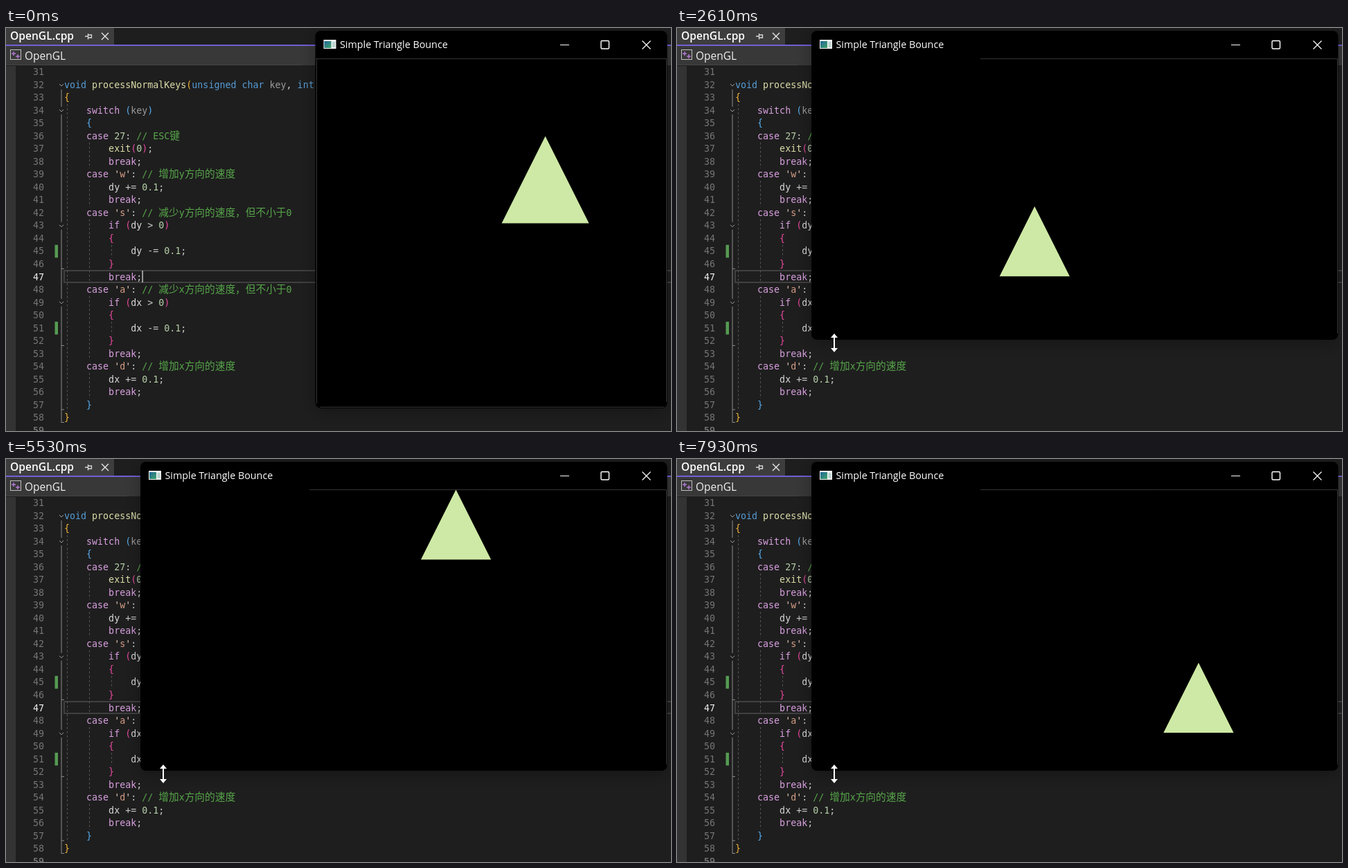
Recreate the animation shown at these times as an HTML page with a canvas. Size 960 by 583 pixels, loop 7.99 s.

```html
<!DOCTYPE html>
<html lang="en">
<head>
<meta charset="utf-8">
<title>Triangle bounce</title>
<style>
html, body { margin: 0; height: 100%; overflow: hidden; background: #1e1e1e; }
canvas { display: block; }
</style>
</head>
<body>
<canvas id="stage" width="960" height="583"></canvas>
<script>
const ctx = document.getElementById('stage').getContext('2d');
const LOOP = 7990, DRAG_START = 1020, DRAG_END = 1600;
const MONO = '13.32px "DejaVu Sans Mono", monospace';
const CJK = '14.7px "Noto Sans CJK SC", "Noto Sans CJK", sans-serif';
const UI = '"Open Sans", "Noto Sans", sans-serif';
const FIRST_LINE = 31, LINE_HEIGHT = 18.52;

const code = `
void processNormalKeys(unsigned char key, int x, int y)
{
    switch (key)
    {
    case 27: // ESC键
        exit(0);
        break;
    case 'w': // 增加y方向的速度
        dy += 0.1;
        break;
    case 's': // 减少y方向的速度，但不小于0
        if (dy > 0)
        {
            dy -= 0.1;
        }
        break;
    case 'a': // 减少x方向的速度，但不小于0
        if (dx > 0)
        {
            dx -= 0.1;
        }
        break;
    case 'd': // 增加x方向的速度
        dx += 0.1;
        break;
    }
}
`.split('\n');

const tokenRules = [
  [/^\/\/.*/, '#57a64a'],
  [/^'/, '#e8c9bb'],
  [/^[wsad](?=')/, '#d69d85'],
  [/^(void|unsigned|char|int)\b/, '#569cd6'],
  [/^(switch|case|break|if)\b/, '#d8a0df'],
  [/^(processNormalKeys|exit)\b/, '#dcdcaa'],
  [/^(key|x|y)\b/, '#9a9a9a'],
  [/^[\d.]+/, '#b5cea8'],
  [/^\w+/, '#dadada'],
  [/^\s+/, '#dadada'],
  [/^[^\w\s]/, '#c8c8c8']
];
const bracketColors = ['#f2b53c', '#58aeee', '#e8489f'];

const clamp01 = v => Math.min(1, Math.max(0, v));
const smooth = v => v * v * (3 - 2 * v);
const mix = (a, b, p) => a + (b - a) * p;

// Reflects an unbounded coordinate between two walls.
function bounce(v, low, high) {
  const span = high - low;
  const phase = (((v - low) % (2 * span)) + 2 * span) % (2 * span);
  return low + span - Math.abs(phase - span);
}

// Distance travelled: the program stalls during the drag and its frame rate wavers.
const travelKeys = [[0, 0], [1060, 161], [1580, 161], [3470, 450], [4120, 548],
  [4870, 642], [6180, 842], [LOOP, 1125]];

function travelled(t) {
  const i = travelKeys.findIndex(([time]) => time > t);
  const [t0, d0] = travelKeys[i - 1], [t1, d1] = travelKeys[i];
  return mix(d0, d1, (t - t0) / (t1 - t0));
}

// Apex position in the final window; each press of D adds to the speed along x.
const keyPresses = [369, 448, 546, 612];

function triangleAt(t) {
  const d = travelled(t);
  const boost = keyPresses.reduce((sum, press) => sum + Math.max(0, d - press), 0);
  return {
    x: bounce(729 - 0.96 * Math.abs(d - 96.5) + 1.045 * boost, 247.5, 899.5),
    y: bounce(134.6 - d, 37, 356)
  };
}

// The dragged lower left corner swings past its resting place.
function cornerAt(t) {
  const p = smooth(clamp01((t - DRAG_START) / (DRAG_END - DRAG_START)));
  return {
    left: mix(446.5, 194, p) - 150 * Math.sin(Math.PI * p) ** 2,
    bottom: mix(549, 450, p)
  };
}

function rect(x, y, w, h, color) {
  ctx.fillStyle = color;
  ctx.fillRect(x, y, w, h);
}

function stroke(color, width, ...lines) {
  ctx.strokeStyle = color;
  ctx.lineWidth = width;
  ctx.beginPath();
  for (const [x, y, ...rest] of lines) {
    ctx.moveTo(x, y);
    for (let i = 0; i < rest.length; i += 2) ctx.lineTo(rest[i], rest[i + 1]);
  }
  ctx.stroke();
}

function polygon(color, ...p) {
  ctx.fillStyle = color;
  ctx.beginPath();
  for (let i = 0; i < p.length; i += 2) ctx.lineTo(p[i], p[i + 1]);
  ctx.closePath();
  ctx.fill();
}

function text(s, x, y, font, color) {
  ctx.font = font;
  ctx.fillStyle = color;
  ctx.fillText(s, x, y);
}

// Latin and Chinese runs have their own font sizes.
function codeText(s, x, y, color) {
  for (const run of s.match(/[ -~]+|[^ -~]+/g)) {
    text(run, x, y, run[0] <= '~' ? MONO : CJK, color);
    x += ctx.measureText(run).width;
  }
  return x;
}

const lineTop = n => 73 + (n - 32) * LINE_HEIGHT;

function drawLineNumber(n) {
  ctx.textAlign = 'right';
  text(n, 55, lineTop(n) + 13.7, MONO, n === 47 ? '#f0f0f0' : '#757575');
  ctx.textAlign = 'left';
}

function drawCode() {
  let depth = 0;
  code.forEach((line, i) => {
    const n = FIRST_LINE + i, top = lineTop(n);
    drawLineNumber(n);

    ctx.setLineDash([3, 3]);
    for (let col = 0; col < line.search(/\S/); col += 4) {
      const x = 88.5 + col * 8;
      stroke('#545454', 1, [x, top, x, top + LINE_HEIGHT]);
    }
    ctx.setLineDash([]);

    let x = 84, rest = line;
    while (rest) {
      const [rule, base] = tokenRules.find(([r]) => r.test(rest));
      const token = rest.match(rule)[0];
      let color = base;
      if (/^[({]$/.test(token)) color = bracketColors[depth++];
      if (/^[)}]$/.test(token)) color = bracketColors[--depth];
      x = codeText(token, x, top + 13.7, color);
      rest = rest.slice(token.length);
    }
  });
  drawLineNumber(59);
}

function drawOutline() {
  const x = 80;
  rect(x - 0.5, 89, 1, 482, '#8c8c8c');
  for (const n of [46, 52, 57, 58]) rect(x, lineTop(n + 1) - 3, 4, 1, '#8c8c8c');
  for (const n of [32, 34, 43, 49]) {
    const y = lineTop(n) + 9;
    rect(x - 3, y - 5, 7, 11, '#1e1e1e');
    stroke('#a0a0a0', 1, [x - 3, y - 1, x, y + 2, x + 3, y - 1]);
  }
}

function drawEditor(t) {
  rect(0, 0, 960, 583, '#1e1e1e');
  rect(0, 55, 14, 528, '#333333');
  rect(0, 0, 156, 24, '#3d3d3d');
  rect(0, 26, 960, 28, '#383838');
  rect(0, 24, 960, 2, '#7160d8');
  rect(0, 53, cornerAt(t).left - 19, 1, '#434343');

  text('OpenGL.cpp', 6, 16.5, '600 15.6px ' + UI, '#fff');
  stroke('#d8d8d8', 1.3, [114, 12, 118, 12], [118.5, 8, 118.5, 16.5],
    [118.5, 10, 123.5, 10, 123.5, 14, 118.5, 14]);
  stroke('#e8e8e8', 1.4, [138, 7, 148, 17], [148, 7, 138, 17]);
  ctx.strokeStyle = '#c0c0c0';
  ctx.lineWidth = 1;
  ctx.strokeRect(6.5, 31.5, 15, 14);
  stroke('#b57ad6', 1.4, [8, 37, 14, 37], [11, 34, 11, 40], [14, 41, 20, 41], [17, 38, 17, 44]);
  text('OpenGL', 27, 45.5, '15.5px ' + UI, '#f0f0f0');

  stroke('#404040', 2, [960, 351, 84, 351, 84, 368, 960, 368]);
  for (const n of [45, 51]) rect(70.5, lineTop(n), 4.5, LINE_HEIGHT, '#559a52');
  drawOutline();
  drawCode();
  if (t % 1060 < 530) rect(196.5, 351, 1.2, 17, '#e8e8e8');
}

function drawWindow(t) {
  const { left, bottom } = cornerAt(t), right = 954.5;
  ctx.save();
  ctx.shadowColor = 'rgba(0,0,0,.3)';
  ctx.shadowBlur = 24;
  ctx.shadowOffsetY = 4;
  ctx.fillStyle = '#000';
  ctx.beginPath();
  ctx.roundRect(left, 4, right - left, bottom - 3, 8);
  ctx.fill();
  ctx.restore();

  const edge = '#343434';
  stroke(edge, 1, [Math.max(left + 1, 438), 44.5, 953.5, 44.5, 953.5, bottom - 8]);
  if (t < DRAG_START) stroke(edge, 1, [448.5, 44, 448.5, 543], [453, 548.5, 950, 548.5]);

  const icon = left + 12;
  rect(icon, 17, 18, 13, '#f2f2f2');
  const fill = ctx.createLinearGradient(icon, 18, icon + 10, 29);
  fill.addColorStop(0, '#1f5fa0');
  fill.addColorStop(1, '#3fa36a');
  rect(icon + 1, 19, 10, 10, fill);
  rect(icon + 12.5, 20, 4, 8, '#b9d4cf');
  text('Simple Triangle Bounce', left + 35.5, 29.3, '14.3px ' + UI, '#fff');
  stroke('#fff', 1.2, [800, 24.5, 813, 24.5], [918.5, 18.5, 930.5, 30.5], [930.5, 18.5, 918.5, 30.5]);
  ctx.strokeStyle = '#fff';
  ctx.lineWidth = 1.4;
  ctx.beginPath();
  ctx.roundRect(859, 18.5, 11.5, 11.5, 1.5);
  ctx.stroke();

  const apex = triangleAt(t), unit = (bottom - 45) / 2, scale = unit / 202.5;
  const x = (left + 955) / 2 + (apex.x - 574) * scale;
  const y = (bottom + 44) / 2 + (apex.y - 247) * scale;
  ctx.save();
  ctx.beginPath();
  ctx.rect(left + 1, 45, 952 - left, bottom - 47);
  ctx.clip();
  polygon('#cee9a5', x, y, x + unit / 4, y + unit / 2, x - unit / 4, y + unit / 2);
  ctx.restore();
}

function drawCursor(t) {
  const { left, bottom } = cornerAt(t);
  const approach = clamp01((t - 400) / (DRAG_START - 400));
  const settle = smooth(clamp01((t - DRAG_END) / 150));
  ctx.save();
  ctx.translate(mix(mix(380, left - 2, approach), 227, settle),
    mix(mix(586, bottom - 3, approach), 455.5, settle));
  if (approach < 1) {
    polygon('#fff', 0, 0, 0, 17, 4, 13.5, 6.5, 19, 9, 18, 6.5, 12.5, 12, 12.5);
  } else {
    if (settle < 0.5) ctx.rotate(Math.PI / 4);
    polygon('#fff', 0, -13.5, 5, -7.5, 1, -7.5, 1, 7.5, 5, 7.5, 0, 13.5,
      -5, 7.5, -1, 7.5, -1, -7.5, -5, -7.5);
  }
  ctx.restore();
}

function frame() {
  const t = performance.now() % LOOP;
  drawEditor(t);
  drawWindow(t);
  drawCursor(t);
  requestAnimationFrame(frame);
}
frame();
</script>
</body>
</html>
```
